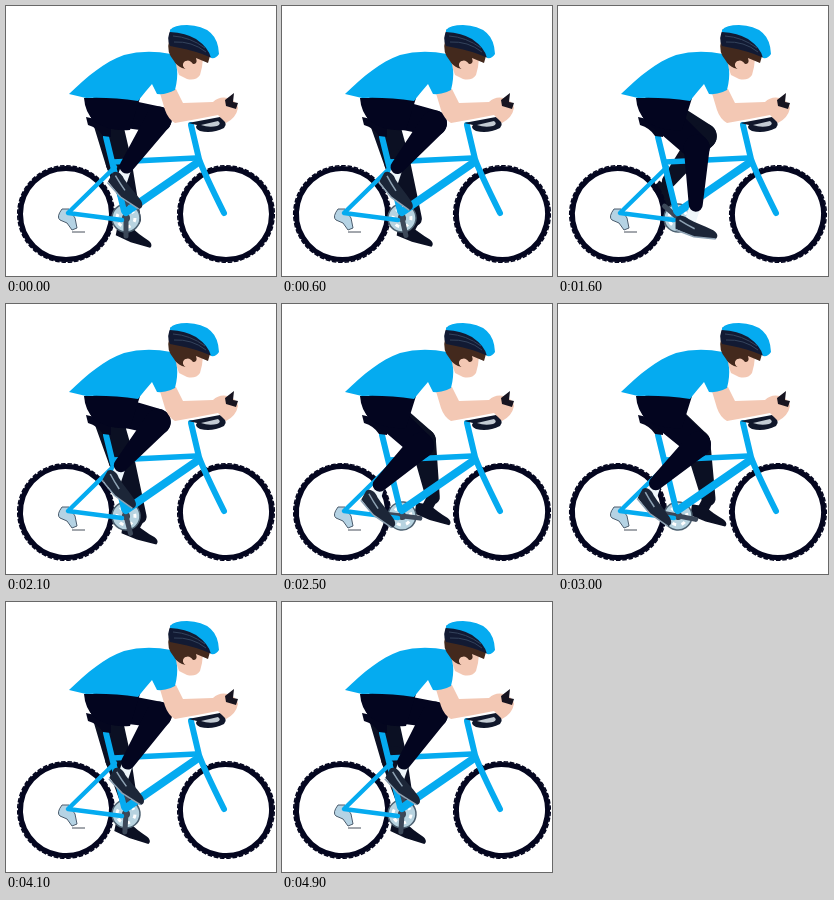
Write an HTML page that moves like this. It is 270 px wide and 270 px high and loops after 5000 ms.

```html
<!DOCTYPE html>
<html lang="en">
<head>
<meta charset="utf-8">
<title>Cyclist</title>
<style>
html, body { margin: 0; width: 100%; height: 100%; overflow: hidden; background: #fff; }
svg { display: block; width: 100%; height: 100%; }
.line { fill: none; stroke: #05abf0; stroke-linecap: round; stroke-linejoin: round; }
</style>
</head>
<body>
<svg viewBox="0 0 270 270">
  <defs>
    <g id="wheel" fill="none" stroke="#04061f">
      <circle r="45.5" stroke-width="5"/>
      <circle r="48.3" stroke-width="1.5" stroke-dasharray="4.5 1.82"/>
    </g>
    <g id="nearShoe">
      <path d="M-20-7C-18-12-11-11-7-8C0-5 9-3 17 0C23 2 25 6 22 9L0 9L-19 3Z" fill="#1c2638"/>
      <path d="M-19 4L0 9L22 9M-16-6Q-8-2 0 1" fill="none" stroke="#8fa3b4" stroke-width="1.5"/>
    </g>
    <g id="farShoe">
      <path d="M-17-8H-3C2-4 9-1 16 2C20 4 21 7 19 9L-1 7L-17 3Z"/>
    </g>
  </defs>

  <g id="farLeg" fill="#0b1023"></g>

  <g id="rear" transform="translate(60 208)"><use href="#wheel"/></g>
  <g id="front" transform="translate(220 208)"><use href="#wheel"/></g>

  <!-- drivetrain -->
  <path d="M56 203Q50 211 54 214L61 217L66 224L71 222L69 212L63 203Z" fill="#b5d3e4" stroke="#4c5d6e"/>
  <path d="M66 226H79" stroke="#333b48" stroke-width=".9"/>
  <g id="ring" transform="translate(120 212)">
    <circle r="14" fill="#b7d3e0" stroke="#4c6070" stroke-width="1.5"/>
    <circle r="9" fill="none" stroke="#fff" stroke-width="3" stroke-dasharray="4 5.42"/>
    <circle r="4" fill="#39424f"/>
  </g>
  <path id="crank" fill="none" stroke="#3c4859" stroke-width="5" stroke-linecap="round"/>

  <!-- frame -->
  <g class="line">
    <path d="M109 161L62 207L116 214" stroke-width="4.5"/>
    <path d="M100 131L118 205" stroke-width="6"/>
    <path d="M107 156L190 152" stroke-width="5.5"/>
    <path d="M120 206L191 157" stroke-width="8"/>
    <path d="M185 119L193 153Q198 167 218 207" stroke-width="6"/>
  </g>
  <path d="M80 111Q88 113 105 116V131L97 130Q92 122 82 119Z" fill="#04061f"/>

  <g id="nearLeg" fill="#03051f"></g>
  <path d="M78 92L134 92L124 124Q102 126 88 115Q79 106 78 92Z" fill="#03051f"/>

  <!-- handlebar -->
  <path d="M182 117L214 111Q223 116 218 122Q206 128 194 125Q188 122 191 119Z" fill="#10172b"/>
  <path d="M195 119L212 115Q216 118 211 120Q203 122 195 119Z" fill="#c3cbd3"/>

  <!-- upper body -->
  <path d="M153 84L170 83L177 97L207 96Q213 90 222 92Q231 95 232 102Q230 112 220 117L212 109Q192 113 169 117Q162 113 159 104Z" fill="#f3c8b4"/>
  <path d="M219 94L228 87L227 96L232 97L230 103L220 100Z" fill="#171420"/>
  <path d="M166 48L174 50L197 52L196 61L194 69Q190 75 181 73L173 69Z" fill="#f3c8b4"/>
  <path d="M63 88C82 70 98 56 118 49Q140 43 165 48Q175 61 169 84Q160 89 151 88L146 78Q139 86 132 95Q105 91 80 92Z" fill="#05abf0"/>

  <!-- head -->
  <path d="M163 35L204 50L202 57L190 52Q192 58 187 58Q183 52 178 56Q175 60 180 63L176 62Q170 59 168 55Q160 46 163 35Z" fill="#43291d"/>
  <ellipse cx="181" cy="59" rx="3.5" ry="4" fill="#f3c8b4"/>
  <path d="M165 23Q160 32 164 40Q182 43 196 48L206 52L203 40L184 27Z" fill="#121a33"/>
  <path d="M168 36Q186 35 200 46M167 30Q184 31 199 42" fill="none" stroke="#34435c"/>
  <path d="M164 24Q168 19 181 19Q212 20 213 48Q210 53 205 52Q203 42 190 33Q180 27 164 26Z" fill="#05abf0"/>
</svg>
<script>
const $ = id => document.getElementById(id);
const LOOP = 5000, STEP = 100, THIGH = 55.5, SHIN = 57;
// time in ms, pedal turns
const turns = [[0, 0], [1100, 1.77], [2100, 2.96], [3000, 4.78],
               [3600, 6.05], [4100, 7.01], [4900, 8.01], [5000, 8.01]];

function pedalTurn(t) {
  const i = turns.findIndex(k => k[0] > t);
  const [t0, a] = turns[i - 1], [t1, b] = turns[i];
  return a + (b - a) * (t - t0) / (t1 - t0);
}

// A limb segment with round ends of different radii
function taper(ax, ay, ra, bx, by, rb) {
  const d = Math.hypot(bx - ax, by - ay), nx = (ay - by) / d, ny = (bx - ax) / d;
  return `<path d="M${ax + nx * ra} ${ay + ny * ra}A${ra} ${ra} 0 0 1 ${ax - nx * ra} ${ay - ny * ra}` +
    `L${bx - nx * rb} ${by - ny * rb}A${rb} ${rb} 0 0 1 ${bx + nx * rb} ${by + ny * rb}Z"/>`;
}

function leg(side, angle, { hx, hy, cx, lift, sock }) {
  const fx = cx + 23 * Math.sin(angle), fy = 206.5 - 23 * Math.cos(angle);
  const ax = fx + 1, ay = fy - lift;
  const dx = ax - hx, dy = ay - hy, d = Math.hypot(dx, dy);
  const along = (THIGH ** 2 - SHIN ** 2 + d * d) / (2 * d);
  const out = Math.sqrt(Math.max(0, THIGH ** 2 - along ** 2));
  const kx = hx + (dx * along + dy * out) / d, ky = hy + (dy * along - dx * out) / d;
  const tilt = 22 + 16 * Math.cos(angle + Math.PI / 4);
  $(side + "Leg").innerHTML =
    `<path d="M${ax} ${ay}L${fx - 5} ${fy - 5}" stroke="${sock}" stroke-width="11"/>` +
    taper(hx, hy, 15, kx, ky, 13) + taper(kx, ky, 13, ax, ay, 7) +
    `<use href="#${side}Shoe" transform="translate(${fx} ${fy}) rotate(${tilt})"/>`;
}

function draw(now) {
  const t = Math.floor(now % LOOP / STEP) * STEP;
  const turn = pedalTurn(t), angle = turn * 2 * Math.PI;
  leg("far", angle + Math.PI, { hx: 98, hy: 102, cx: 127, lift: 16, sock: "#0b1023" });
  leg("near", angle, { hx: 98, hy: 104, cx: 119.5, lift: 23, sock: "#eef6fa" });
  const sx = 18 * Math.sin(angle), sy = 18 * Math.cos(angle);
  $("crank").setAttribute("d", `M${120 - sx} ${212 + sy}L${120 + sx} ${212 - sy}`);
  $("ring").setAttribute("transform", `translate(120 212) rotate(${turn * 360})`);
  $("rear").setAttribute("transform", `translate(60 208) rotate(${turn * 900})`);
  $("front").setAttribute("transform", `translate(220 208) rotate(${turn * 900})`);
}

const start = performance.now();
function tick() {
  draw(performance.now() - start);
  requestAnimationFrame(tick);
}
tick();
</script>
</body>
</html>
```
